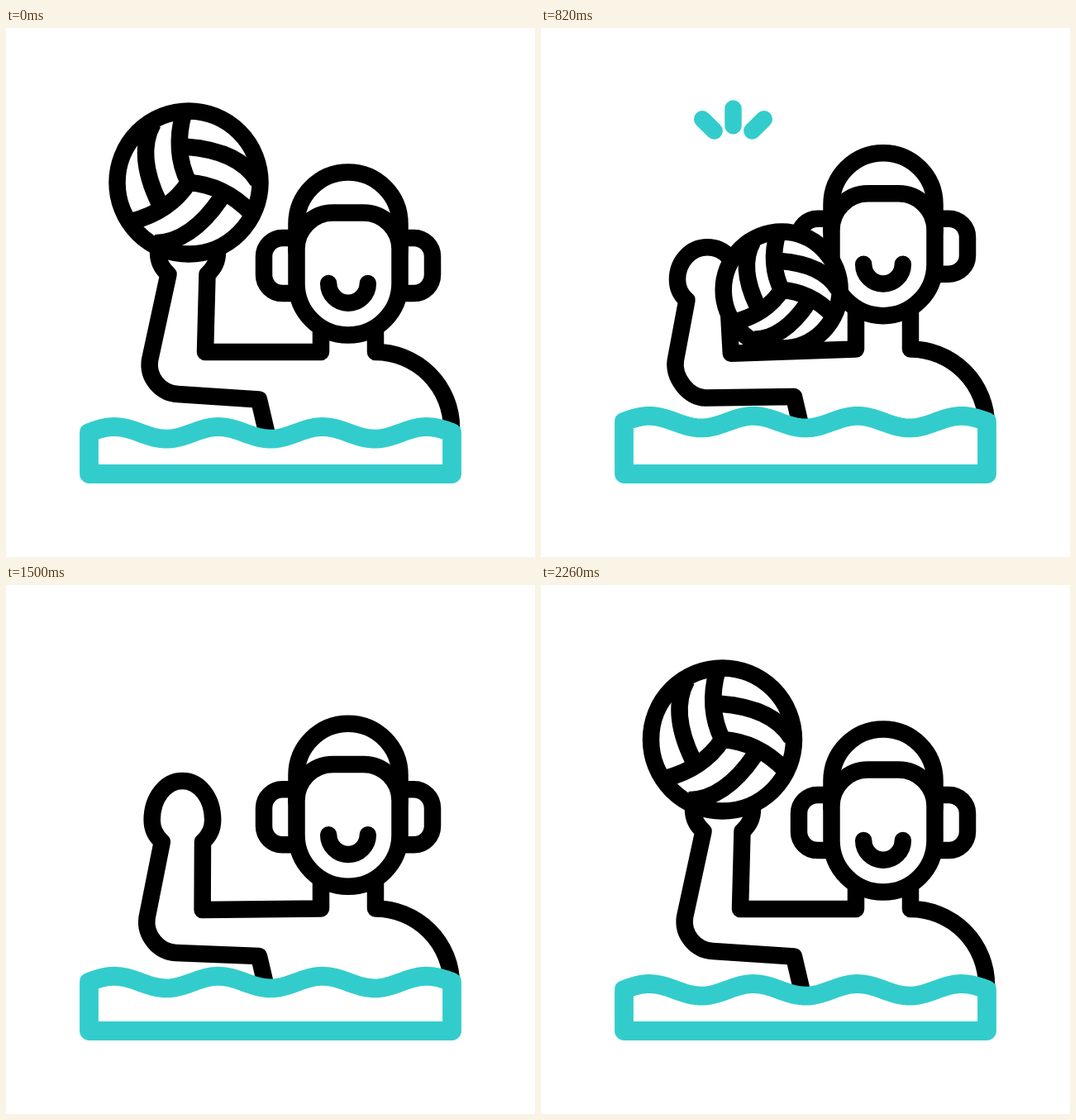
Recreate the animation shown at these times as an HTML page with a canvas. Size 640x640 px, loop 2440 ms.

```html
<!DOCTYPE html>
<html lang="en">
<head>
<meta charset="utf-8">
<title>Water polo</title>
<style>
  html, body { margin: 0; width: 100%; height: 100%; overflow: hidden; background: #fff; }
  canvas { display: block; width: 640px; height: 640px; }
</style>
</head>
<body>
<canvas id="stage" width="640" height="640"></canvas>
<script>
const ctx = document.getElementById('stage').getContext('2d');
const LOOP = 2440, END = 2260, STEP = 20;
const INK = '#000', AQUA = '#33cccc', PAPER = '#fff';
const BALL_RADIUS = 86.5;

const mix = (a, b, u) => a + (b - a) * u;
const span = (t, from, to) => Math.min(1, Math.max(0, (t - from) / (to - from)));
const ease = (t, from, to) => {
  const u = span(t, from, to);
  return u * u * (3 - 2 * u);
};
// Rises from 0 to 1 at the peak and falls back.
const swell = (t, from, peak, to) => ease(t, from, peak) - ease(t, peak, to);

const headLift = t => -25.7 * swell(t, 0, 730, 1210) - 15.6 * swell(t, 1210, 1850, END);
const waterLift = t => -18.5 * (swell(t, 0, 610, 1200) + swell(t, 1200, 1800, END));
const bodyLift = t =>
  -5.5 * swell(t, 0, 680, 1200) + 6 * swell(t, 680, 1200, 1800) - 7 * swell(t, 1200, 1800, END);

function shape(build, { stroke = INK, fill, width = 20.5 } = {}) {
  ctx.beginPath();
  build();
  if (fill) { ctx.fillStyle = fill; ctx.fill(); }
  ctx.strokeStyle = stroke;
  ctx.lineWidth = width;
  ctx.stroke();
}

function shifted(dy, draw) {
  ctx.save();
  ctx.translate(0, dy);
  draw();
  ctx.restore();
}

function drawRays(t) {
  const s = ease(t, 150, 365) - ease(t, 700, 900);
  if (s < 0.02) return;
  shape(() => {
    for (const side of [-1, 0, 1]) {
      const [dx, inner, outer] = side ? [side, 41, 82] : [0, 59, 118];
      const spread = side ? 24 * dx : 0;
      ctx.moveTo(232.5 + (dx * inner + spread) * s, 139 - inner * s);
      ctx.lineTo(232.5 + (dx * outer + spread) * s, 139 - outer * s);
    }
  }, { stroke: AQUA });
}

// The arm rests upright, is raised for the throw and drops after it.
function drawArm(t) {
  const raise = swell(t, 0, 540, 980);
  const drop = swell(t, 540, 980, 1720);
  const x = 220 + 10 * raise - 31 * drop;
  const wristY = 298 - 28.5 * raise + 62 * drop;
  const wrist = 23.5 - 7 * raise + 5 * drop;
  const palm = wrist + 12.5 - 1.5 * drop;
  const palmY = wristY - 27 + 3 * drop;
  const tipY = wristY - 78 + 20 * drop;
  const bendX = 174 - 16 * drop, bendY = 402 + 5 * drop;
  const bendEndX = 208 - 13 * drop, bendEndY = 443 + 11.5 * drop;
  const cupY = mix(palmY, wristY, 0.6), fingerY = mix(palmY, tipY, 0.55);

  shape(() => {
    ctx.moveTo(381, 345);
    ctx.lineTo(381, 392);
    ctx.lineTo(241 - 16 * drop, 392 + 7.5 * drop);
    ctx.lineTo(x + wrist, wristY);
    ctx.quadraticCurveTo(x + palm, cupY, x + palm, palmY);
    ctx.bezierCurveTo(x + palm, fingerY, x + palm * 0.57, tipY, x, tipY);
    ctx.bezierCurveTo(x - palm * 0.57, tipY, x - palm, fingerY, x - palm, palmY);
    ctx.quadraticCurveTo(x - palm, cupY, x - wrist, wristY);
    ctx.lineTo(bendX, bendY);
    ctx.bezierCurveTo(bendX - 3, bendY + 21, bendEndX - 21, bendEndY - 1, bendEndX, bendEndY);
    ctx.lineTo(306, 449.5);
    ctx.lineTo(319, 505);
  });
}

function drawShoulder() {
  shape(() => {
    ctx.moveTo(447, 345);
    ctx.lineTo(447, 392);
    ctx.arc(447, 484, 92, -Math.PI / 2, 0);
    ctx.lineTo(539, 515);
  });
}

function drawHead() {
  const x = 414, r = 62.5, chinY = 309, browY = 223.6;
  for (const side of [-1, 1]) {
    const base = x + side * r, edge = x + side * 102;
    shape(() => {
      ctx.moveTo(base, 254);
      ctx.arcTo(edge, 254, edge, 290, 22.5);
      ctx.arcTo(edge, 321, base, 321, 22.5);
      ctx.lineTo(base, 321);
    }, { fill: PAPER });
  }
  shape(() => {
    ctx.moveTo(x - r, 270);
    ctx.arc(x, 237, r, Math.PI, 0);
    ctx.lineTo(x + r, 270);
  }, { fill: PAPER });
  shape(() => {
    ctx.moveTo(x - r, chinY);
    ctx.arcTo(x - r, browY, x, browY, 44);
    ctx.arcTo(x + r, browY, x + r, chinY, 44);
    ctx.arc(x, chinY, r, 0, Math.PI);
    ctx.closePath();
  }, { fill: PAPER });
  shape(() => ctx.arc(x, chinY, 23.8, Math.PI, 0, true));
}

function ballState(t) {
  if (t > 1100) {
    return { x: 219.5, y: mix(-100, 187, ease(t, 1820, END)), scale: 1 };
  }
  const lift = ease(t, 0, 540);
  const fall = Math.max(0, (t - 540) / 440);
  return {
    x: 221 + 18 * lift + 185 * fall ** 2.8,
    y: 187 - 12 * lift + 367 * fall ** 2.1,
    scale: 1 - 0.23 * ease(t, 0, 380) + 0.045 * ease(t, 380, 680),
  };
}

function drawBall(t) {
  const { x, y, scale: k } = ballState(t);
  ctx.save();
  ctx.beginPath();
  ctx.rect(0, 0, 640, 540);
  ctx.clip();
  ctx.translate(x, y);
  shape(() => ctx.arc(0, 0, BALL_RADIUS * k, 0, Math.PI * 2), { fill: PAPER });
  ctx.lineCap = 'butt';
  for (let i = 0; i < 3; i++) {
    shape(() => {
      ctx.moveTo(0, 0);
      ctx.quadraticCurveTo(-19 * k, -38 * k, -6 * k, -84 * k);
      ctx.moveTo(-43 * k, -72 * k);
      ctx.quadraticCurveTo(-64 * k, -34 * k, -36 * k, 24 * k);
    });
    ctx.rotate(Math.PI * 2 / 3);
  }
  ctx.restore();
}

function drawWater(lift) {
  const left = 100.5, right = 539.5, bottom = 539.5;
  const waveY = x => 489.8 + lift - 7.3 * Math.cos((x - 131) / 126 * Math.PI * 2);
  shape(() => {
    ctx.moveTo(left, bottom);
    for (let x = left; x < right; x += 3) ctx.lineTo(x, waveY(x));
    ctx.lineTo(right, waveY(right));
    ctx.lineTo(right, bottom);
    ctx.closePath();
  }, { stroke: AQUA, fill: PAPER, width: 22.8 });
}

function draw(t) {
  ctx.fillStyle = PAPER;
  ctx.fillRect(0, 0, 640, 640);
  ctx.lineCap = ctx.lineJoin = 'round';
  drawRays(t);
  shifted(bodyLift(t), () => {
    drawArm(t);
    drawShoulder();
  });
  shifted(headLift(t), drawHead);
  drawBall(t);
  drawWater(waterLift(t));
}

const start = performance.now();
function tick() {
  const t = (performance.now() - start) % LOOP;
  draw(Math.min(END, Math.floor(t / STEP) * STEP));
  requestAnimationFrame(tick);
}
tick();
</script>
</body>
</html>
```
